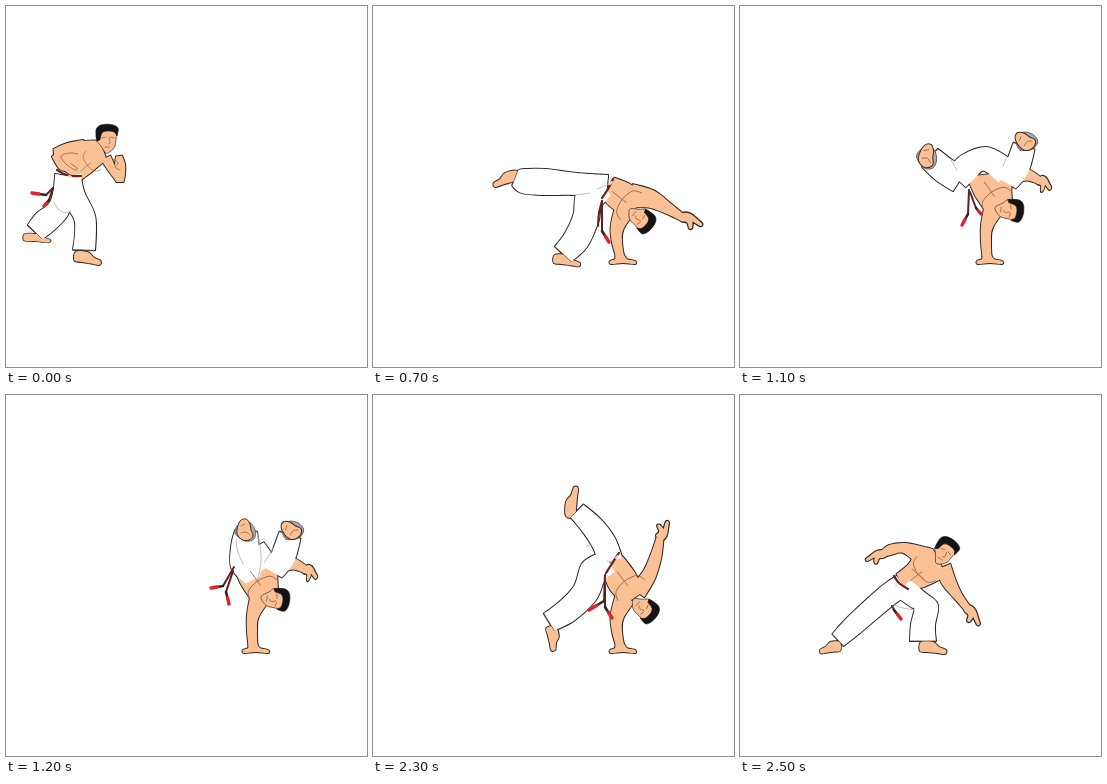
These frames come from a looping animation (361 px wide and 361 px high, 2.6 s). An HTML page:

```html
<!DOCTYPE html>
<html lang="en">
<head>
<meta charset="utf-8">
<title>Capoeira</title>
<style>
html, body { margin: 0; width: 100%; height: 100%; overflow: hidden; background: #fff; }
svg { display: block; width: 100vw; height: 100vh; }
path { fill: none; stroke-linecap: round; stroke-linejoin: round; }
.skin { fill: #fbc194; }
.pants { fill: #fff; }
.outline { stroke: #2c2724; stroke-width: 2; }
.face { fill: #fbc194; stroke: #5e4231; stroke-width: .8; }
.sole { fill: #fbc194; stroke: #3d2c22; stroke-width: 1; }
.hair { fill: #151313; stroke: #151313; stroke-width: .6; }
.cuff { fill: #a9abae; stroke: #55565a; stroke-width: .8; }
.hem { stroke: #4b4643; stroke-width: .8; }
.line { stroke: #8f6142; stroke-width: .8; }
.fold { stroke: #b4b6b9; stroke-width: .9; }
.belt { stroke: #67201c; stroke-width: 2.2; }
.knot { stroke: #f3d9dc; stroke-width: 2; }
.cord { stroke: #641c20; stroke-width: 2; }
.dark { stroke: #2a2620; stroke-width: 2.6; }
.tassel { stroke: #e5202b; stroke-width: 3.4; }
</style>
</head>
<body>
<svg id="stage" viewBox="0 0 361 361"></svg>
<script>
const NS = 'http://www.w3.org/2000/svg';
const SOLID = ['skin', 'pants', 'face', 'sole', 'hair', 'cuff'];

// "x,y" or "x,y,r" key points; "!" marks a sharp corner.
const parse = text => text.split(' ').map(s => {
  const [x, y, r] = s.replace('!', '').split(',').map(Number);
  return { x, y, r, sharp: s.endsWith('!') };
});

function smooth(pts, closed) {
  const n = pts.length;
  const at = i => closed ? pts[(i + n) % n] : pts[Math.max(0, Math.min(n - 1, i))];
  const handle = (i, dir) => {
    const p = at(i), a = at(i - 1), b = at(i + 1), k = p.sharp ? 0 : dir / 6;
    return `${p.x + (b.x - a.x) * k} ${p.y + (b.y - a.y) * k}`;
  };
  let d = `M${pts[0].x} ${pts[0].y}`;
  for (let i = 0; i < (closed ? n : n - 1); i++) {
    d += `C${handle(i, 1)} ${handle(i + 1, -1)} ${at(i + 1).x} ${at(i + 1).y}`;
  }
  return closed ? d + 'Z' : d;
}

const draw = (kind, text) => ({ kind, d: smooth(parse(text), SOLID.includes(kind)) });

// Both sides of a limb whose half-width r varies along its joints.
function sides(joints) {
  const last = joints.length - 1;
  const side = sign => joints.map((p, i) => {
    const a = joints[Math.max(0, i - 1)], b = joints[Math.min(last, i + 1)];
    const k = sign * p.r / Math.hypot(b.x - a.x, b.y - a.y);
    return { x: p.x - (b.y - a.y) * k, y: p.y + (b.x - a.x) * k, sharp: i === 0 || i === last };
  });
  return [side(1), side(-1)];
}

function limb(kind, text) {
  const [left, right] = sides(parse(text));
  return { kind, d: smooth([...left, ...right.reverse()], true) };
}
const flesh = text => limb('skin', text);

function leg(text) {
  const [left, right] = sides(parse(text));
  return [limb('pants', text), { kind: 'hem', d: smooth([left.at(-1), right.at(-1)]) }];
}

const place = (shapes, x, y, angle, sx = 1, sy = 1) =>
  shapes.map(s => ({ ...s, move: `translate(${x} ${y}) rotate(${angle}) scale(${sx} ${sy})` }));
const stamp = (...shapes) => (...where) => place(shapes, ...where);

const head = stamp(
  draw('face', '-10,-5 -10,3 -6,8 -1,15 4,13 8,8 9,0 9,-6 0,-10'),
  draw('hair', '-10,3! -11,-8 -6,-13 4,-13.5 11,-10 10,-2! 7,-6 0,-7 -5,-5 -7,2!'),
  draw('line', '-5,0 -1,-1'),
  draw('line', '3,-1 7,0'),
  draw('line', '2,0 3,5 1,6'),
  draw('line', '-2,9 3,9')
);
const foot = stamp(draw('skin', '-6,0 -7,9 0,10 10,11 18,12 19,8 12,5 6,0'));
const hand = stamp(draw('skin', '0,-3 6,-4 13,-1 17,1 16,3 9,1! 10,6 8,7 5,3 0,3'));
const sole = stamp(
  draw('cuff', '-10,3 -6,-6 4,-8 10,0 9,9 0,11'),
  draw('sole', '-7,6 -8,0 -5,-9 1,-11 5,-6 6,0 8,6 4,10 -2,10'),
  draw('line', '-4,3 1,2 5,5'),
  draw('line', '-4,-4 0,-6')
);
const chest = stamp(
  draw('line', '-17,-10 -13,-2 0,1 13,-2 17,-10'),
  draw('line', '0,-4 0,13')
);

// Hanging cord that ends in a dark knot and a red tassel.
function sash(x0, y0, x1, y1, x2, y2) {
  const mid = `${(x1 + x2) / 2},${(y1 + y2) / 2}`;
  return [
    draw('cord', `${x0},${y0} ${x1},${y1}`),
    draw('dark', `${x1},${y1} ${mid}`),
    draw('tassel', `${mid} ${x2},${y2}`)
  ];
}

const palm = place([draw('skin', '-7,-10 -8,-5 -13,-3 -12,0 0,-1 12,0 12,-3 4,-5 0,-10')], 250, 258, 0);

const stance = [
  foot(25, 228, 0, 1, .7), foot(76, 246, 3),
  flesh('63,168,12 76,152,17 97,144,10'),
  flesh('78,144,10 62,145,8 48,147,4'),
  flesh('49,148,4 58,159,6 66,161,3'),
  flesh('100,152,5 106,163,4 113,174,3'),
  flesh('113,150,3 114,158,5 114,168,5 114,176,3.5'),
  leg('61,170,12 58,188,11 52,204,11 39,216,12 29,226,10'),
  leg('63,170,12 67,190,12 79,213,10.5 78,244,11'),
  draw('fold', '48,196 52,203 59,207 65,205'),
  draw('belt', '51,164 58,168 66,170 75,170'), draw('knot', '63,170 65,171'),
  sash(47, 182, 40, 189, 26, 187), sash(47, 182, 43, 194, 38, 200),
  draw('line', '72,148 64,147 55,150 60,158 69,164 71,162 65,158'),
  draw('line', '107,153 112,157 109,161 114,164'),
  chest(82, 159, 50, .7, .7), head(101, 132, 0)
];

const lunge = [
  sash(152, 211, 154, 215, 161, 224),
  foot(95, 247, 0, -.78, .95), foot(187, 247, 0),
  hand(144, 159, 168, 1.1, -1.1), hand(227, 213, 48, 1.2, 1.2),
  flesh('161,188,10 177,180,14 190,168,19 198,164,11'),
  flesh('180,160,9 164,153,5 150,155,5 143,159,3.5'),
  flesh('203,172,8 209,187,7 218,201,4.5 228,214,3.5'),
  leg('163,190,11 147,201,11 114,230,10 98,245,8'),
  leg('163,193,11 177,204,10 186,212,12 183,230,12 183,246,13'),
  draw('fold', '154,210 163,213 174,215'),
  draw('belt', '154,181 159,188 168,194'), draw('knot', '157,189 156,191'),
  chest(179, 179, 53, .9, .9), draw('line', '172,174 184,184'),
  head(205, 156, 34)
];

const reach = [
  foot(138, 166, -10, -1, 1), foot(188, 249, 2, 1, .9),
  hand(309, 211, 15, 1.25, 1.3),
  flesh('235,182,12 251,192,15 264,199,10'),
  flesh('258,190,12 278,193,9 296,203,5.5 310,212,3.5'),
  flesh('252,203,10 244,222,6.5 244,236,5 247,250,4'), palm,
  leg('234,181,12 203,178,11 172,176,13 150,175,12 142,172,8'),
  leg('231,181,11 216,194,14 213,212,13 203,234,13 190,248,11'),
  draw('fold', '202,189 210,188 217,187'), draw('fold', '224,183 237,178'),
  draw('belt', '240,173 235,183 229,192'), draw('knot', '239,176 237,178'),
  draw('cord', '229,195 226,207 225,220'), sash(229, 195, 229, 225, 236, 236),
  chest(250, 194, 128), head(268.5, 213, 129)
];

const wheel = [
  foot(193, 114, -90, 1.15, 1), foot(184, 236, 70, .9, 1),
  hand(286, 143, -55, 1.1, -1.2),
  flesh('239,167,12 250,187,15 261,203,11'),
  flesh('264,197,9 276,180,7 283,161,5.5 287,143,3.5'),
  flesh('252,203,10 244,222,6.5 244,236,5 247,250,4'), palm,
  leg('238,167,12 231,148,12 219,131,11 204,116,9'),
  leg('236,167,12 221,176,14 212,198,13 194,216,12 176,227,10'),
  draw('fold', '219,150 214,151'), draw('fold', '234,166 239,166 244,162'),
  draw('belt', '246,158 240,167 233,178'), draw('knot', '245,161 243,163'),
  sash(232, 180, 231, 206, 216, 215), sash(232, 190, 232, 212, 239, 223),
  chest(252, 187, 142), head(272, 214, 129)
];

// Shared by both handstand poses.
const upper = [
  hand(299, 174, 27, .85, 1.3),
  flesh('275,170,8 288,169,5.5 300,175,3.5'),
  flesh('251,168,24 253,184,19 259,201,14'),
  flesh('256,198,11 247,220,6 246,236,5 247,250,4.5'), palm,
  leg('268,178,9 277,162,12 284,140,11')
];
const front = [sole(285, 135, -45), chest(252, 187, 145), head(270, 204, 97)];

const tuck = [
  sash(228, 172, 217, 191, 205, 193), sash(227, 176, 220, 197, 223, 209),
  upper,
  limb('pants', '250,152,9 262,172,11'),
  leg('247,185,8 240,170,15 239,152,14 240,136,11'),
  draw('fold', '230,146 232,157 237,169'), draw('fold', '267,153 263,160 258,168'),
  draw('fold', '251,138 254,151 255,167 252,183'),
  sole(239, 135, 0), front
];

const swing = [
  sash(229, 184, 228, 208, 222, 219), sash(230, 186, 236, 202, 241, 208),
  upper,
  limb('pants', '266,166,13 246,153,12 229,160,13 217,173,12'),
  leg('220,174,13 204,164,13 190,152,12'),
  draw('fold', '211,154 217,164'), draw('fold', '266,153 263,160'),
  sole(187, 150, 15, 1, 1.1), front
];

const poses = { stance, lunge, reach, wheel, swing, tuck };
const LOOP = 2600;
const cues = [
  [0, 'stance'], [500, 'lunge'], [700, 'reach'], [900, 'wheel'], [1100, 'swing'],
  [1200, 'tuck'], [2200, 'swing'], [2300, 'wheel'], [2400, 'reach'], [2500, 'lunge']
];

// Outlines go below all fills, so limbs merge into one silhouette.
function build(parts) {
  const g = document.createElementNS(NS, 'g');
  const add = (s, kind) => {
    const p = document.createElementNS(NS, 'path');
    p.setAttribute('class', kind);
    p.setAttribute('d', s.d);
    if (s.move) p.setAttribute('transform', s.move);
    g.append(p);
  };
  const isBody = s => s.kind === 'skin' || s.kind === 'pants';
  const all = parts.flat(Infinity);
  const body = all.filter(isBody);
  body.forEach(s => add(s, 'outline'));
  body.forEach(s => add(s, s.kind));
  all.filter(s => !isBody(s)).forEach(s => add(s, s.kind));
  return document.getElementById('stage').appendChild(g);
}

const groups = Object.entries(poses).map(([name, parts]) => [name, build(parts)]);

function show(ms) {
  const t = ms % LOOP;
  const pose = cues.findLast(([start]) => start <= t)[1];
  for (const [name, g] of groups) g.setAttribute('display', name === pose ? 'inline' : 'none');
}

const begin = performance.now();
function tick() {
  show(performance.now() - begin);
  requestAnimationFrame(tick);
}
show(0);
requestAnimationFrame(tick);
</script>
</body>
</html>
```
